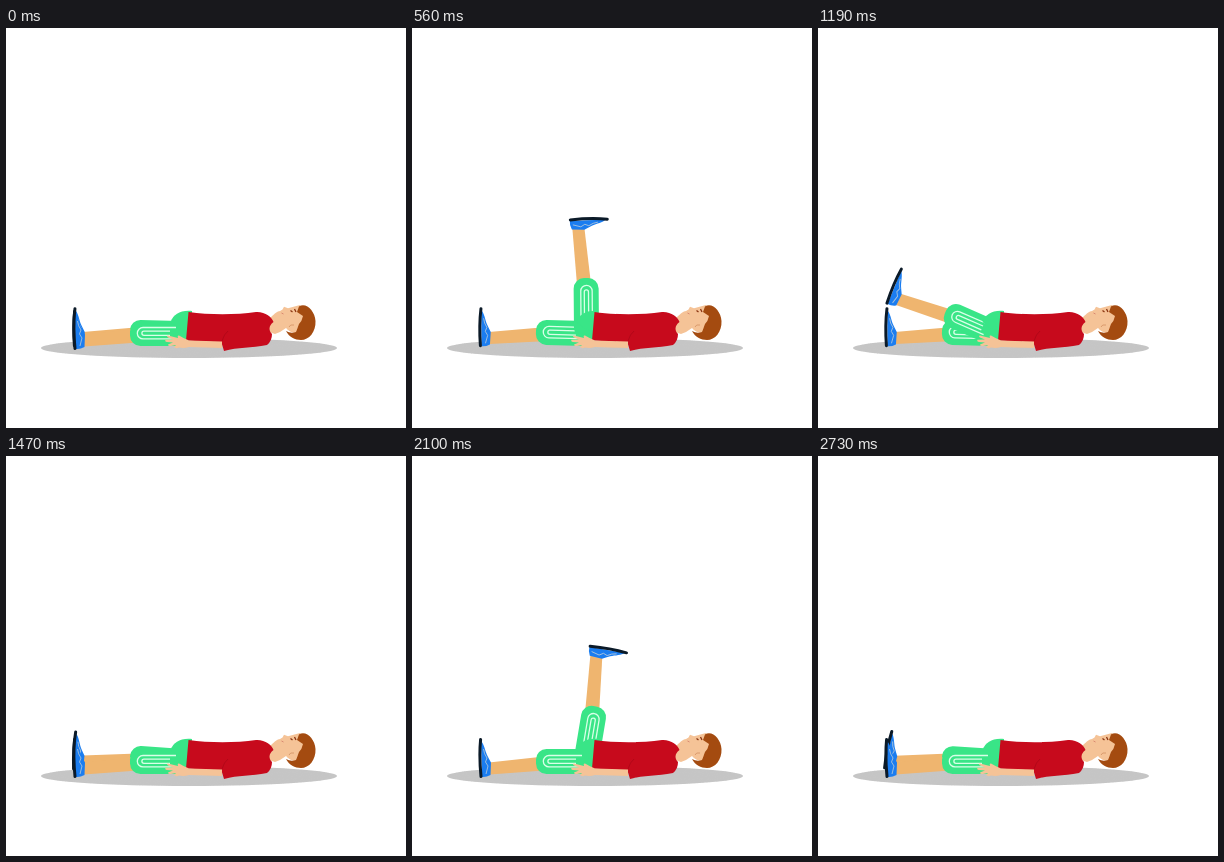
Write an HTML page that moves like this. It is 400 by 400 pixels and loops after 2.8 s.

```html
<!DOCTYPE html>
<html lang="en">
<head>
<meta charset="utf-8">
<title>Leg raises</title>
<style>
  html, body { margin: 0; width: 100%; height: 100%; overflow: hidden; background: #fff; }
  svg { display: block; width: 100vw; height: 100vh; }
</style>
</head>
<body>
<svg viewBox="0 0 400 400">
  <defs>
    <filter id="grain" x="0" y="0" width="100%" height="100%">
      <feTurbulence type="fractalNoise" baseFrequency=".9" numOctaves="1" seed="4"/>
      <feColorMatrix values="0 0 0 0 .55  0 0 0 0 .55  0 0 0 0 .55  1.2 0 0 0 -.45"/>
      <feComposite in2="SourceGraphic" operator="in" result="n"/>
      <feMerge><feMergeNode in="SourceGraphic"/><feMergeNode in="n"/></feMerge>
    </filter>
    <g id="foot">
      <path d="M69 285C72 288 73 294 75 299Q77 303 79 306.500L78.500 319Q74 321.500 70 321Z" fill="#1b7df0"/>
      <path d="M71.500 293Q72 298 75 302L73.500 306L76 310L74 318" fill="none" stroke="#a9c3dc" stroke-width=".9"/>
      <path d="M68.600 283.500Q67 300 69 320.500" fill="none" stroke="#0b1a28" stroke-width="3" stroke-linecap="round"/>
    </g>
    <path id="shin" d="M77 306.500L132 300.500V314.500L78 318.500Z" fill="#efb56f"/>
    <g id="thigh">
      <rect x="124" y="293" width="60" height="25" rx="10.500" fill="#39e587"/>
      <path d="M170 299.500H137a5.700 5.700 0 0 0 0 11.400H168M164 303.200H138a2 2 0 0 0 0 4.200H164" fill="none" stroke="#d9ffe8" stroke-width="1.300"/>
    </g>
  </defs>

  <ellipse cx="183" cy="320" rx="148" ry="10" fill="#c6c6c6" filter="url(#grain)"/>

  <g class="leg"><g class="lower"><use href="#shin"/><use class="foot" href="#foot"/></g><use href="#thigh"/></g>
  <g class="leg"><g class="lower"><use href="#shin"/><use class="foot" href="#foot"/></g><use href="#thigh"/></g>
  <path d="M186 283C174 282 168 286 164.500 294L172 300L186 306Z" fill="#39e587"/>

  <!-- head -->
  <path d="M262 291C267 289 268 284 274 283L276.500 281.500L278 278.800L282 280.200L294 277L300 292L291 305Q284 305 280 300Q275 304 269 306L263 304Z" fill="#f5c397"/>
  <path d="M293 278.500C300 274 309 283 309.500 293C310 304 303 312 295 312C289 312 283 309 280 303Q285 306 290 304L293 296Q296 293 297 288L291 284Z" fill="#a44b10"/>
  <path d="M290 295Q283 293 280 298Q282 304 289 304Q293 300 290 295Z" fill="#f5c397"/>
  <path d="M288 297Q284 296 283 299" fill="none" stroke="#d99a6c" stroke-width="1"/>
  <path d="M284.500 282.500L286.500 284M288.500 281L290 284" stroke="#8a3411" stroke-width="1.300" fill="none"/>
  <path d="M275.500 285L277.500 286" stroke="#d98a72" stroke-width="1"/>

  <!-- shirt, arm and hand -->
  <path d="M182.500 284C203 287 230 287 250 284C259 283.500 266 289 267.500 294C262 298 263 303 266 306Q266 313 261 317C245 320 232 319 218 323L215.500 314.500L180 312.500Z" fill="#c70a1c"/>
  <path d="M216 313Q218 306 222 303" fill="none" stroke="#ad0717" stroke-width=".8"/>
  <path d="M216 313.500L183 312.500Q177 310 173 307.500Q171 307 172 310L162 307.500Q160 308 162 309.500L167 311.500L159.500 311.800Q158.500 313.500 161 314L167 314.500L162 316.500Q162 318.500 165 318L170 317L168 319Q170 321 173 319.500Q178 320.500 183 319L216 320Z" fill="#f5c397"/>
</svg>
<script>
  const LOOP = 2800, HALF = 1400;
  const HIP = '177 303', ANKLE = '78 312';

  const [far, near] = [...document.querySelectorAll('.leg')].map(leg => ({
    leg,
    lower: leg.querySelector('.lower'),
    foot: leg.querySelector('.foot')
  }));

  const lift = p => p > 0 && p < 1 ? Math.sin(Math.PI * p) ** 2 : 0;

  function pose(part, angle, reach, flex) {
    const out = reach * Math.sin(angle * 1.4 * Math.PI / 180);
    part.leg.setAttribute('transform', `rotate(${angle} ${HIP})`);
    part.lower.setAttribute('transform', `translate(${-out} ${out * .08})`);
    part.foot.setAttribute('transform', `rotate(${flex} ${ANKLE})`);
  }

  function draw(now) {
    const t = now % LOOP;
    const p = (t - HALF) / HALF;
    pose(near, 100 * lift(t / 1420), 4, 0);
    pose(far, 1.5 + 98 * lift(p), 5, p > 0 ? 12 * p * p - 3 * p : 0);
  }

  const start = performance.now();
  function tick() {
    draw(performance.now() - start);
    requestAnimationFrame(tick);
  }
  tick();
</script>
</body>
</html>
```
